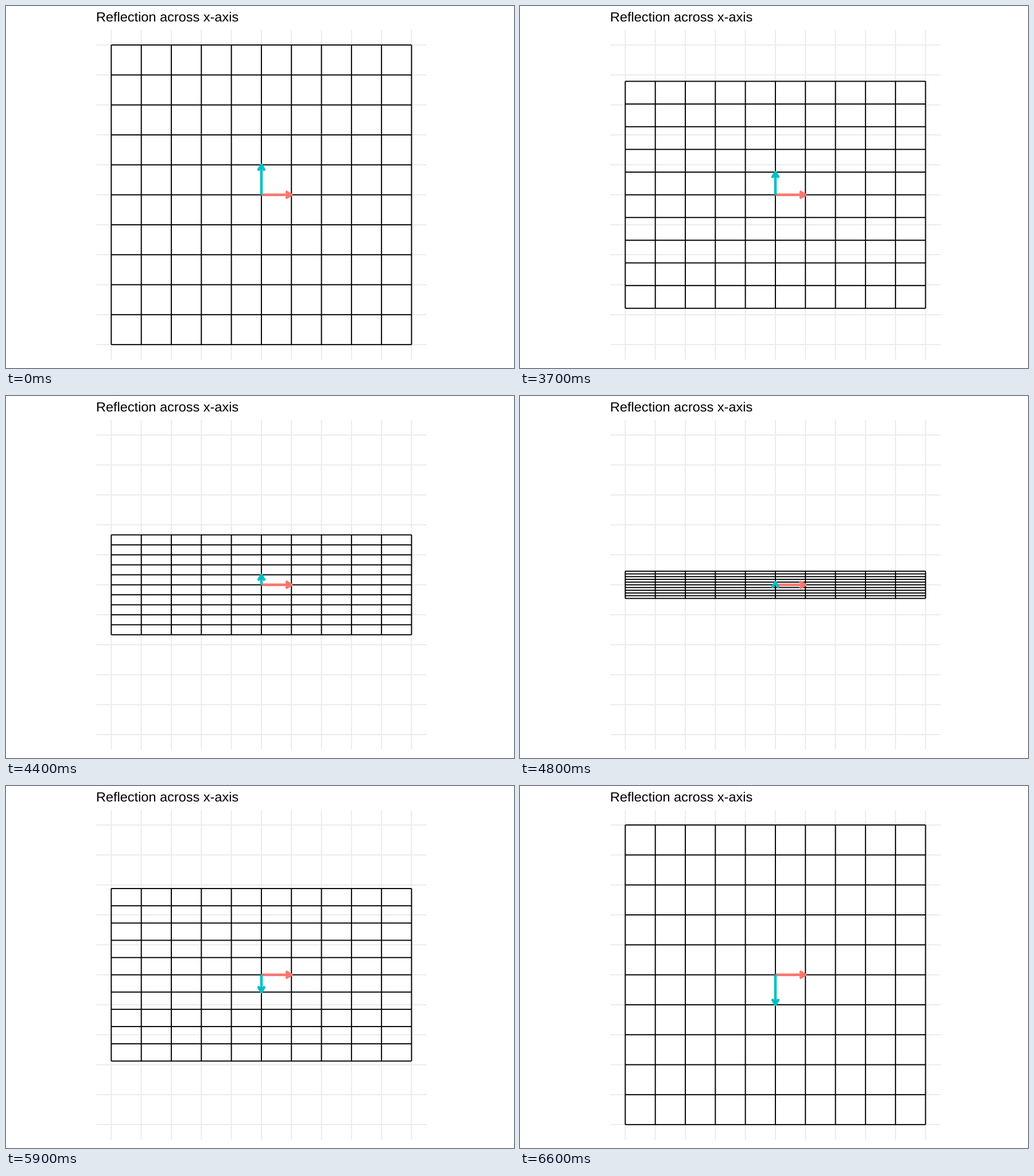
A matplotlib script for the animation above (10 s loop, 885 by 632 pixels).

```python
import numpy as np
import matplotlib.pyplot as plt
from matplotlib.animation import FuncAnimation
from matplotlib.collections import LineCollection

plt.rcParams["text.hinting"] = "none"

WIDTH, HEIGHT, DPI = 885, 632, 64
CX, CY, UNIT = 444.94, 329.63, 52.31   # origin and grid step in pixels
FRAMES, INTERVAL = 100, 100
START, STEPS = 33, 33                  # last still frame, length of the flip
HEAD_LENGTH, HEAD_ANGLE = 11.5, np.pi / 6
TICKS = np.arange(-5, 6)


def pt(px):
    return px * 72 / DPI


def to_px(x, y):
    return CX + UNIT * x, CY - UNIT * y


def grid(extent, scale=1.0):
    """Grid lines reaching to +-extent, with y multiplied by scale."""
    segments = []
    for t in TICKS:
        segments.append([to_px(t, -extent * scale), to_px(t, extent * scale)])
        segments.append([to_px(-extent, t * scale), to_px(extent, t * scale)])
    return segments


def add_lines(segments, color, width):
    lines = LineCollection(segments, colors=color, linewidths=pt(width),
                           capstyle="butt")
    lines.set_snap(False)
    return ax.add_collection(lines, autolim=False)


def add_arrow(color):
    style = dict(color=color, lw=pt(4.55), solid_capstyle="butt",
                 solid_joinstyle="round", snap=False)
    shaft, = ax.plot([], [], **style)
    head, = ax.plot([], [], **style)
    return shaft, head


def place_arrow(arrow, x, y):
    tip_x, tip_y = to_px(x, y)
    back = np.arctan2(CY - tip_y, CX - tip_x)
    wings = back + np.array([-HEAD_ANGLE, HEAD_ANGLE])
    wx = tip_x + HEAD_LENGTH * np.cos(wings)
    wy = tip_y + HEAD_LENGTH * np.sin(wings)
    arrow[0].set_data([CX, tip_x], [CY, tip_y])
    arrow[1].set_data([wx[0], tip_x, wx[1]], [wy[0], tip_y, wy[1]])


fig = plt.figure(figsize=(WIDTH / DPI, HEIGHT / DPI), dpi=DPI,
                 facecolor="white")
ax = fig.add_axes([0, 0, 1, 1])
ax.set_autoscale_on(False)
ax.set(xlim=(0, WIDTH), ylim=(HEIGHT, 0))
ax.axis("off")

ax.text(CX - 5.5 * UNIT, 27.1, "Reflection across x-axis", color="black",
        family="Liberation Sans", size=pt(23.47), va="baseline")
add_lines(grid(5.5), "#EBEBEB", 1.9).set_zorder(1)
plane = add_lines(grid(5), "black", 1.9)
plane.set_zorder(1.5)
x_basis = add_arrow("#F8766D")
y_basis = add_arrow("#00BFC4")
place_arrow(x_basis, 1, 0)


def update(frame):
    step = np.clip(frame - START, 0, STEPS)
    scale = 1 - 2 * step / STEPS
    plane.set_segments(grid(5, scale))
    place_arrow(y_basis, 0, scale)
    return plane, *y_basis


anim = FuncAnimation(fig, update, frames=FRAMES, interval=INTERVAL,
                     init_func=lambda: update(0), repeat=True, repeat_delay=0)
plt.show()
```
